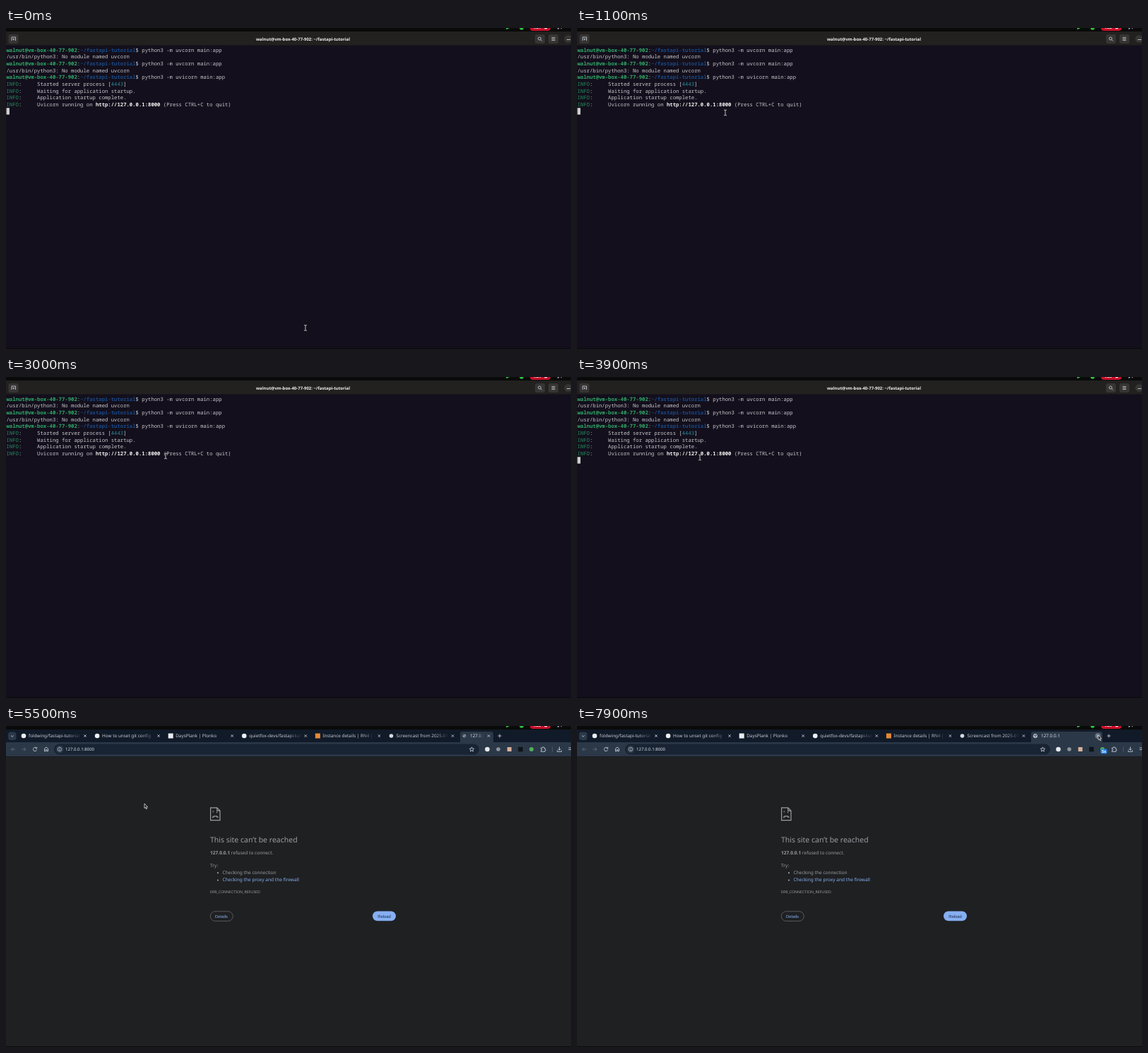
An HTML page that plays this animation: 800x455 px, repeating every 8000 ms.

```html
<!DOCTYPE html>
<html lang="en">
<head>
<meta charset="utf-8">
<title>Terminal and browser</title>
<style>
  html, body { margin: 0; height: 100%; overflow: hidden; background: #000; }
  svg { display: block; width: 100vw; height: 100vh; }
  text { white-space: pre; text-rendering: geometricPrecision; font-family: "Noto Sans", sans-serif; }
  .mono text { font: 7.28px "Noto Sans Mono", monospace; fill: #c9c9cd; }
  .mono .user { fill: #30aa68; font-weight: bold; }
  .mono .path { fill: #194a86; font-weight: bold; }
  .mono .info { fill: #278f5f; }
  .mono .pid { fill: #2b8a9b; }
  .mono .url { fill: #f0f0f0; font-weight: bold; }
  .line { fill: none; stroke: #c3c9d2; stroke-width: .9; }
  .tab text { font-size: 6.35px; }
  .page text { font-size: 6.57px; fill: #9a9da1; }
  .page .link { fill: #86b0f3; }
  .page .button { font: 5.9px "Liberation Sans", Arial, sans-serif; }
</style>
</head>
<body>
<svg viewBox="0 0 800 455" preserveAspectRatio="none">
  <defs>
    <linearGradient id="fade" gradientUnits="userSpaceOnUse" x1="62" x2="82">
      <stop stop-color="#c5cad3"/><stop offset="1" stop-color="#c5cad3" stop-opacity="0"/>
    </linearGradient>
    <linearGradient id="newFade" gradientUnits="userSpaceOnUse" x1="20" x2="28">
      <stop stop-color="#dce1e8"/><stop offset="1" stop-color="#dce1e8" stop-opacity="0"/>
    </linearGradient>
  </defs>

  <g id="terminal" class="mono">
    <path fill="#130f1c" d="M0 24H800V455H0z"/>
    <path fill="#222120" d="M0 5H800V24.5H0z"/>
    <g fill="#363534">
      <rect x="3.5" y="9" width="14" height="13" rx="2.5"/>
      <rect x="749" y="9" width="14" height="13" rx="2.5"/>
      <rect x="768" y="9" width="14" height="13" rx="2.5"/>
      <circle cx="796" cy="15.5" r="5.5"/>
    </g>
    <g class="line">
      <path d="M8 18V13H13.5V18M9.5 16H12M10.75 14.7V17.3M794 16.5H799"/>
      <circle cx="755.5" cy="15" r="2"/>
      <path d="M757 16.5L759 18.5M772.5 13.5H777.5M772.5 15.5H777.5M772.5 17.5H777.5"/>
    </g>
    <text x="420.5" y="17.6" text-anchor="middle" style="font:bold 6px 'Noto Sans',sans-serif;fill:#f2f2f2">walnut@vm-box-40-77-902: ~/fastapi-tutorial</text>
    <g id="lines"></g>
    <rect id="caret" x=".6" y="113.3" width="4.3" height="9.4" fill="#d2d2d2"/>
  </g>

  <g id="browser">
    <path fill="#111a28" d="M0 5H800V23H0z"/>
    <path fill="#2b3848" d="M0 23H800V43.3H0z"/>
    <path fill="#1f2022" d="M0 43.3H800V455H0z"/>
    <rect x="3" y="8.5" width="11.5" height="11.5" rx="3.5" fill="#2b3848"/>
    <path class="line" d="M7 13.5L8.8 15.2L10.6 13.5"/>
    <g id="tabs"></g>
    <g class="tab" transform="translate(649 14)">
      <path id="newTab" fill="#2b3848"/>
      <g class="line">
        <g id="loading"><circle r="1.9" stroke-width=".7"/><path d="M-1.3 1.3L1.3-1.3"/></g>
        <g id="globe"><circle r="2.7" fill="#c3c9d2"/><path d="M-2.4-1L0-.5L-.3 1.2L1 2.4M1-2.5L.8-.8L2.6 0" stroke="#2b3848"/></g>
      </g>
      <text x="8" y="2.3" fill="url(#newFade)">127.0.0.1</text>
      <g id="newClose"><circle id="closeHover" r="4" fill="#607083"/><path class="line" d="M-1.7-1.7L1.7 1.7M1.7-1.7L-1.7 1.7"/></g>
      <path id="plus" class="line" d="M-2.5 0H2.5M0-2.5V2.5"/>
    </g>
    <rect x="68" y="25.5" width="602" height="15" rx="7.5" fill="#182333"/>
    <circle cx="76" cy="33" r="5.5" fill="#2b3848"/>
    <g class="line">
      <path stroke="#5f6b7a" d="M13 33H7.5M10 30.5L7.5 33L10 35.5M22.5 33H28M25.5 30.5L28 33L25.5 35.5"/>
      <path d="M43 31.3A2.6 2.6 0 1 0 43.6 33.5M43.7 29.8V31.8H41.7M54.5 35.8V32L57 30L59.5 32V35.8H57.8V33.5H56.2V35.8z"/>
      <circle cx="76" cy="33" r="2.8" stroke-width=".7"/><path d="M76 32.7V34.7M76 31.2V31.9"/>
      <path d="M659.5 29.9L660.4 32L662.7 32.2L660.9 33.7L661.5 36L659.5 34.8L657.5 36L658.1 33.7L656.3 32.2L658.6 32z"/>
      <path d="M757.5 31H759.5Q759.5 29.5 760.5 29.5T761.5 31H763V33Q764.3 33 764.3 34T763 35V36.3H757.5V34.7Q759 34.7 759 33.7T757.5 32.7z"/>
      <path d="M783.5 29.5V34M781.5 32.3L783.5 34.3L785.5 32.3M780.5 34.5V36.3H786.5V34.5M796.5 31H800M796.5 33.5H800"/>
      <path stroke="#4f5d70" d="M773.5 29.5V37"/>
    </g>
    <text x="84" y="35.2" font-size="6.05" fill="#dce1e7">127.0.0.1:8000</text>
    <circle cx="681.5" cy="33" r="3.3" fill="#e8eaed"/>
    <circle cx="697" cy="33" r="2.8" fill="#8d949c"/>
    <rect x="709.7" y="30" width="6" height="6" fill="#d9b199"/>
    <rect x="725.2" y="29.7" width="6.6" height="6.6" fill="#0f1515"/>
    <circle cx="744" cy="33" r="3" fill="#54ad58"/>
    <g id="badge">
      <rect x="741.5" y="32.5" width="9" height="6.8" rx="1.5" fill="#2581e6"/>
      <text id="badgeText" x="746" y="38" text-anchor="middle" font-size="5.5" font-weight="bold" fill="#fff"></text>
    </g>

    <g class="page">
      <g fill="none" stroke="#9a9da1" stroke-width="1.2">
        <path d="M289.6 115.9H298.8L303 120.1V133.6H289.6zM298.8 115.9V120.1H303"/>
        <path d="M293.3 120.5V122.3M298.6 121.5V123.3M292.6 130.3V129H294V127.8H298.6V129H300V130.3"/>
      </g>
      <text x="289" y="164.5" style="font-size:10.5px">This site can’t be reached</text>
      <text x="289" y="182.3"><tspan font-weight="bold">127.0.0.1</tspan> refused to connect.</text>
      <text x="289" y="199.5">Try:</text>
      <circle cx="300" cy="208.2" r="1.1" fill="#9a9da1"/><text x="306.5" y="210">Checking the connection</text>
      <circle cx="300" cy="218.6" r="1.1" fill="#9a9da1"/><text x="306.5" y="220.3" class="link">Checking the proxy and the firewall</text>
      <text x="289" y="236.8" style="font-size:5.25px">ERR_CONNECTION_REFUSED</text>
      <rect x="289.3" y="262.8" width="32" height="13.7" rx="6.85" fill="none" stroke="#65686d" stroke-width=".8"/>
      <text x="305" y="271.8" text-anchor="middle" class="button link">Details</text>
      <rect x="519" y="262.5" width="33" height="13.8" rx="6.9" fill="#86aff2"/>
      <text x="535.5" y="271.5" text-anchor="middle" class="button" style="fill:#1d2d4c">Reload</text>
    </g>
  </g>

  <path fill="#0a0a0a" d="M0 0H800V5H0zM0 454H800V455H0z"/>
  <path fill="#2fc43f" d="M708 0H713L708.5 2.2z"/>
  <circle cx="730" cy="0" r="2.8" fill="#2fc43f"/>
  <path fill="#c8102a" d="M742 0H771Q771 4 767 4H746Q742 4 742 0z"/>
  <text id="timer" x="746.5" y="1.3" font-size="5.5" font-weight="bold" fill="#fff"></text>
  <path fill="#fff" d="M762.5 0H766V1.2H762.5z"/>
  <path class="line" d="M781.5 0V1.5L783.5 0M785.5 0L787 1"/>

  <g id="ibeam" fill="none">
    <path id="beam" stroke="#000" stroke-width="1.8"/>
    <path id="beamCore" stroke="#e6e6e6" stroke-width=".9"/>
  </g>
  <path id="arrow" fill="#111" stroke="#e6e6e6" stroke-width=".8" d="M0 0V6.5L1.5 5.2L2.6 7.8L3.7 7.3L2.6 4.8H4.6z"/>
</svg>
<script>
const el = id => document.getElementById(id);
const show = (id, on) => el(id).style.display = on ? '' : 'none';
const place = (id, x, y) => el(id).setAttribute('transform', `translate(${x} ${y})`);
const span = (cls, text) => `<tspan class="${cls}">${text}</tspan>`;

for (const id of ['beam', 'beamCore'])
  el(id).setAttribute('d', 'M-2-4Q0-4 0-3Q0-4 2-4M0-3V3M-2 4Q0 4 0 3Q0 4 2 4');

const prompt = command =>
  span('user', 'walnut@vm-box-40-77-902') + ':' + span('path', '~/fastapi-tutorial') + '$ ' + command;
const info = message => span('info', 'INFO') + ':     ' + message;
const missing = '/usr/bin/python3: No module named uvcorn';

el('lines').innerHTML = [
  prompt('python3 -m uvcorn main:app'), missing,
  prompt('python3 -m uvcorn main:app'), missing,
  prompt('python3 -m uvicorn main:app'),
  info(`Started server process [${span('pid', '4443')}]`),
  info('Waiting for application startup.'),
  info('Application startup complete.'),
  info(`Uvicorn running on ${span('url', 'http://127.0.0.1:8000')} (Press CTRL+C to quit)`)
].map((line, i) => `<text x=".5" y="${33.6 + 9.67 * i}">${line}</text>`).join('');

const disc = '<circle r="3.3" fill="#eceff3"/>';
const square = color => `<rect x="-3.5" y="-3.5" width="7" height="7" fill="${color}"/>`;
el('tabs').innerHTML = [
  [disc, 'foldwing/fastapi-tutorial'],
  [disc, 'How to unset git config'],
  [square('#e9ecef'), 'DaysPlank | Plonko'],
  [disc, 'quietfox-devs/fastapi-tutorial'],
  [square('#e58a35'), 'Instance details | RN4 | us-east'],
  ['<circle r="2.8" fill="#d5dae0"/>', 'Screencast from 2025-01']
].map(([icon, title], i) => `<g class="tab" transform="translate(${25 + 104.1 * i} 14)">${icon}
  <text x="7" y="2.3" fill="url(#fade)">${title}</text>
  <path class="line" d="M85.3-1.7L88.7 1.7M88.7-1.7L85.3 1.7"/></g>`).join('');

// Pointer path: time, x, y
const track = [
  [0, 424, 425], [900, 222, 121], [1100, 210, 120], [1800, 156, 113], [1900, 152, 112],
  [2200, 152, 112], [3000, 226, 112], [3100, 288, 112], [3300, 174, 114], [4000, 174, 114],
  [4400, 270, 143], [4700, 200, 113], [4900, 199, 112], [5100, 196, 110], [5600, 196, 110],
  [6900, 325, 173], [7100, 345, 168], [7800, 734, 18], [7900, 738, 13], [8000, 738, 13]
];

function pointerAt(t) {
  const i = track.findIndex(key => key[0] > t);
  const [t0, x0, y0] = track[i - 1], [t1, x1, y1] = track[i];
  const k = (t - t0) / (t1 - t0);
  return [x0 + (x1 - x0) * k, y0 + (y1 - y0) * k];
}

const LOOP = 8000, STEP = 100, SWITCH = 5400;

function draw(t) {
  const browsing = t >= SWITCH;
  show('terminal', !browsing);
  show('browser', browsing);
  show('ibeam', !browsing);
  show('arrow', browsing);
  place(browsing ? 'arrow' : 'ibeam', ...pointerAt(t));
  show('caret', t >= 4700 || (t + 100) % 1200 < 600);
  el('timer').textContent = '4:' + (21 + Math.floor((t + 100) / 1000));

  // The new tab widens right after the switch.
  const width = Math.max(12, Math.min(101, (t - SWITCH) * .47));
  const right = width - 6;
  el('newTab').setAttribute('d',
    `M-8 10Q-6 10-6 8V-3Q-6-6-3-6H${right - 3}Q${right}-6 ${right}-3V8Q${right} 10 ${right + 2} 10z`);
  el('newFade').setAttribute('x1', right - 23);
  el('newFade').setAttribute('x2', right - 13);
  place('newClose', right - 6.5, 0);
  place('plus', right + 9, 0);
  show('loading', t < 5700);
  show('globe', t >= 5700);
  show('closeHover', t >= 7800);

  show('badge', t >= 5700);
  el('badgeText').textContent = Math.floor((t - 2500) / 1000) + 's';
}

const start = performance.now();
function tick() {
  const t = (performance.now() - start) % LOOP;
  draw(Math.floor(t / STEP) * STEP);
  requestAnimationFrame(tick);
}
tick();
</script>
</body>
</html>
```
